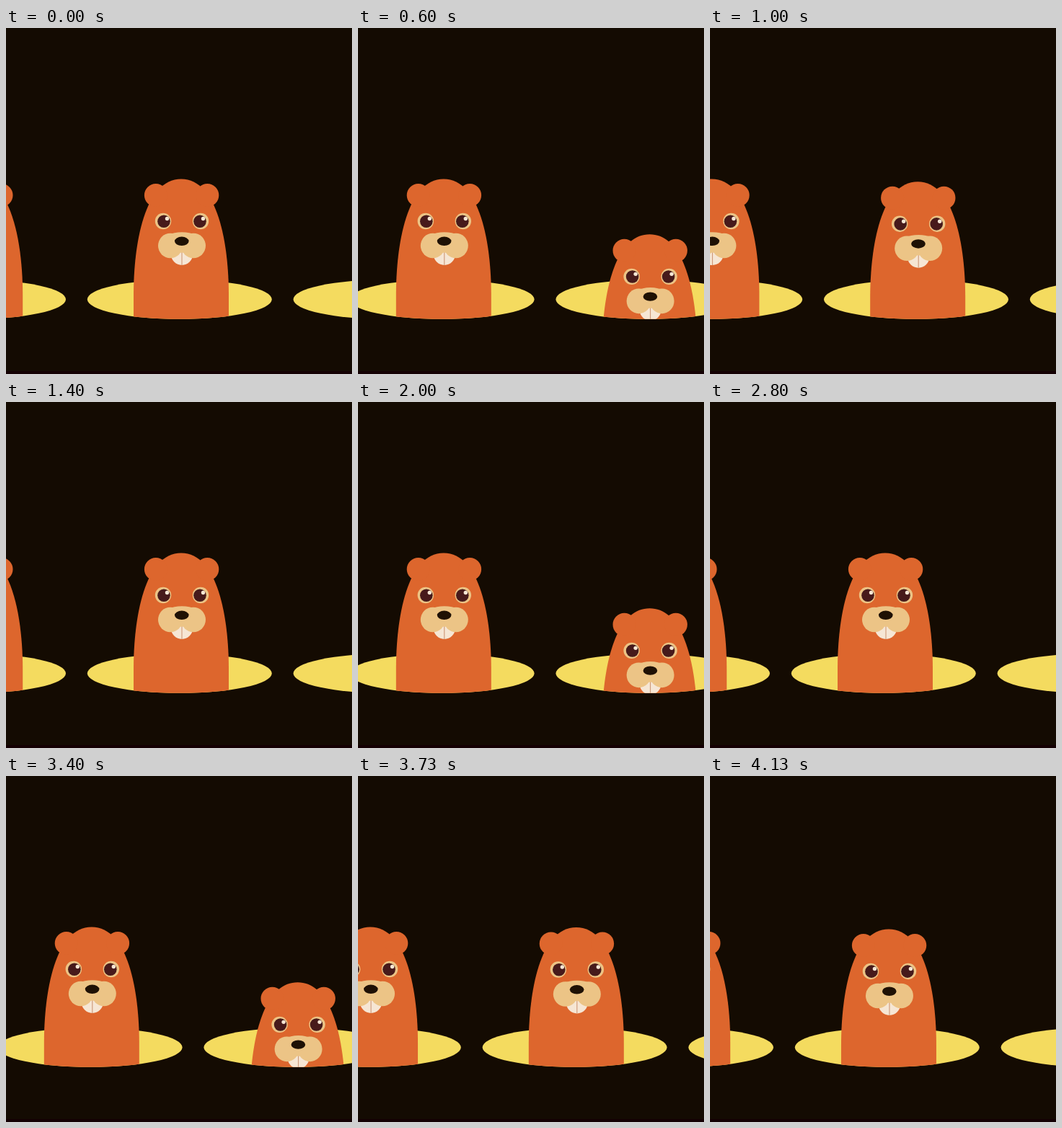
An HTML page with a canvas for the animation above (4190 ms loop, 480 by 480 pixels).

```html
<!DOCTYPE html>
<html lang="en">
<head>
<meta charset="utf-8">
<title>Gophers</title>
<style>
html, body { margin: 0; width: 100%; height: 100%; overflow: hidden; background: #140b02; }
canvas { display: block; }
</style>
</head>
<body>
<canvas id="stage" width="480" height="480"></canvas>
<script>
const ctx = document.getElementById('stage').getContext('2d');
const LOOP = 4190, STEP = 1000 / 15, STEPS = 21;
const GAP = 285.8, HOLE_Y = 376.5, HOLE_RX = 128, HOLE_RY = 27.3, HIDDEN = 204;
const FUR = '#dd662d', TAN = '#ecc486', CREAM = '#f6e6d4';

function oval(color, x, y, rx, ry = rx) {
  ctx.fillStyle = color;
  ctx.beginPath();
  ctx.ellipse(x, y, rx, ry, 0, 0, 2 * Math.PI);
  ctx.fill();
}

// Fraction of one gap scrolled: steady drift that slows down near each stop.
function scroll(p) {
  const wave = q => Math.sin(2 * Math.PI * q / STEPS);
  return p / STEPS - 0.102 * (wave(p + 0.85) - wave(0.85));
}

function ease(p, start, end, from, to) {
  const u = (p - start) / (end - start);
  return from + (to - from) * (1 - Math.cos(Math.PI * u)) / 2;
}

// Depth of the rising gopher: pop up, overshoot, dip, settle.
function depth(p) {
  if (p < 5) return HIDDEN;
  if (p < 12) return ease(p, 5, 12, HIDDEN, -4);
  if (p < 16) return ease(p, 12, 16, -4, 5);
  return 5 * (1 - ((p - 16) / 5) ** 4);
}

// Coordinates are relative to the body's middle line.
function gopher() {
  ctx.fillStyle = FUR;
  ctx.beginPath();
  ctx.moveTo(-66, 420);
  ctx.lineTo(-66, 370);
  ctx.bezierCurveTo(-66, 300, -51, 209.5, 0, 209.5);
  ctx.bezierCurveTo(51, 209.5, 66, 300, 66, 370);
  ctx.lineTo(66, 420);
  ctx.fill();

  for (const side of [-1, 1]) {
    oval(FUR, 0.6 + side * 35.7, 232, 16);
    oval(TAN, 1 + side * 26, 268, 11.2);
    oval('#471a1b', 1 + side * 25, 268.2, 8.8);
    oval(CREAM, 5.5 + side * 25, 264.5, 2.7);
  }

  oval(CREAM, 1, 314, 15);
  ctx.fillStyle = '#c98f6c';
  ctx.fillRect(0.5, 311, 1, 18);
  oval(TAN, 1, 297.5, 27, 14.3);
  oval(TAN, -15, 302, 17, 17.3);
  oval(TAN, 17, 302, 17, 17.3);
  oval('#1f1104', 0.8, 295.8, 9.8, 6.2);
}

function slot(x, drop) {
  oval('#f4db5f', x, HOLE_Y, HOLE_RX, HOLE_RY);
  if (drop >= HIDDEN) return;
  ctx.save();
  ctx.beginPath();
  ctx.moveTo(x - HOLE_RX, 0);
  ctx.lineTo(x + HOLE_RX, 0);
  ctx.ellipse(x, HOLE_Y, HOLE_RX, HOLE_RY, 0, 0, Math.PI);
  ctx.clip();
  ctx.translate(x + 2.2, drop);
  gopher();
  ctx.restore();
}

function draw(now) {
  const p = Math.floor((now % LOOP + 5) / STEP) % STEPS;
  ctx.fillStyle = '#140b02';
  ctx.fillRect(0, 0, 480, 480);
  ctx.fillStyle = '#140003';
  ctx.fillRect(0, 476, 480, 4);
  for (let k = -1; k <= 2; k++) {
    const drop = k < 1 ? 0 : k === 1 ? depth(p) : HIDDEN;
    slot(240.8 + GAP * (k - scroll(p)), drop);
  }
}

const start = performance.now();
function tick() {
  draw(performance.now() - start);
  requestAnimationFrame(tick);
}
tick();
</script>
</body>
</html>
```
